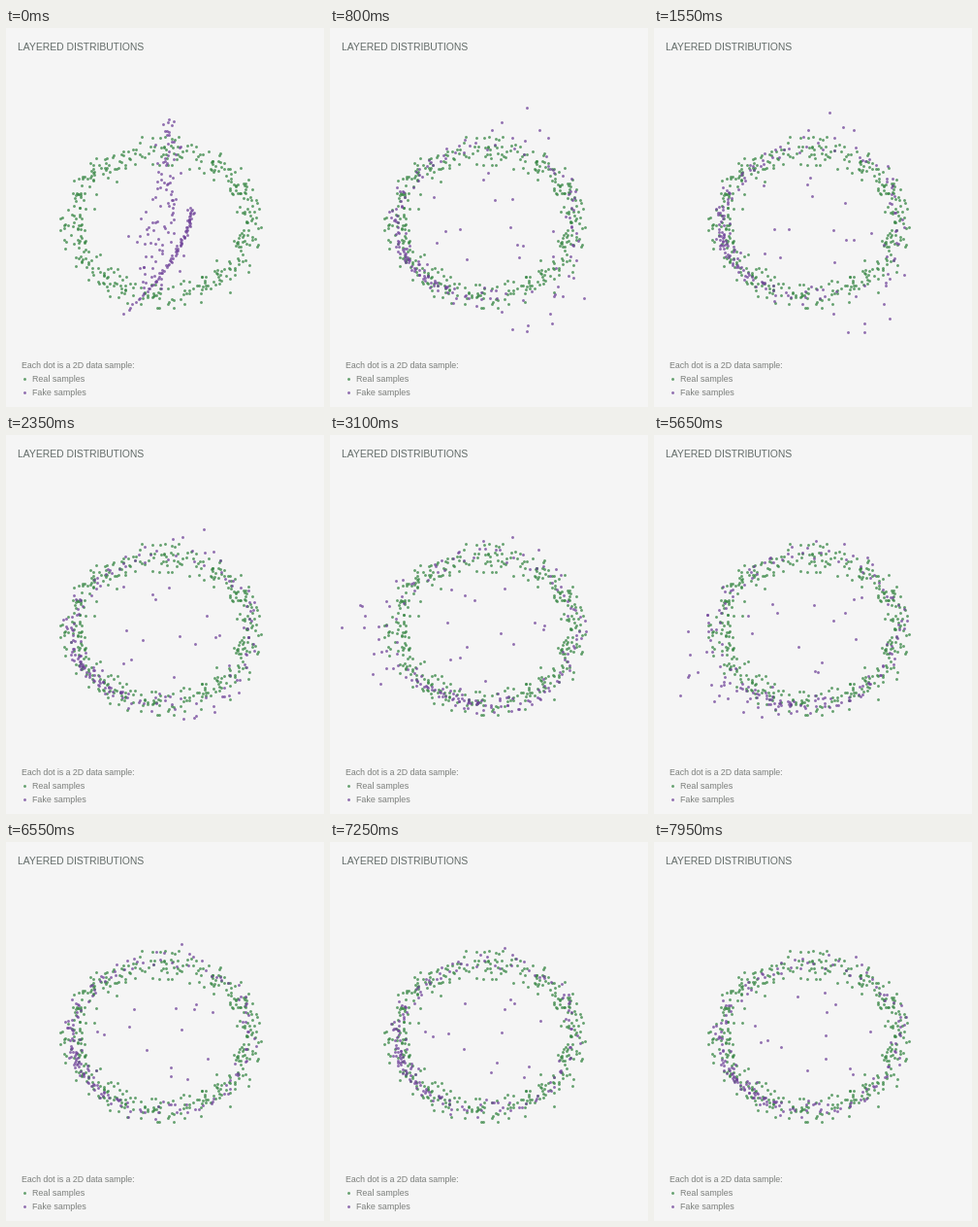
Write a matplotlib script that moves like this. It is 328 px wide and 390 px high and loops after 8 s.

```python
import numpy as np
import matplotlib.pyplot as plt
from matplotlib.animation import FuncAnimation

W, H, DPI = 328, 390, 100
STEP, FRAMES = 50, 160
PT = 72 / DPI
GREEN, PURPLE = "#358542", "#6f4299"
CX, CY, RX, RY = 161, 200, 91, 74
REAL, CURVE, LOOSE = 400, 165, 14

rng = np.random.default_rng(4)


def ring(deg, scale=1.0):
    a = np.radians(deg)
    return np.stack([CX + RX * scale * np.cos(a),
                     CY + RY * scale * np.sin(a)], axis=-1)


def jitter(n, limit):
    return np.clip(rng.normal(0, 1, (n, 2)), -limit, limit)


# Real samples: a noisy ellipse that stays still.
real = ring(np.linspace(0, 360, REAL) + rng.normal(0, 4, REAL)) + 7.2 * jitter(REAL, 2)

# Fixed latent values of the fake samples.
u = (np.arange(CURVE) + rng.uniform(0, 1, CURVE)) / CURVE
reach = rng.uniform(0, 1, CURVE) ** 1.3
noise = jitter(CURVE, 1.8)
k = np.arange(LOOSE)
loose_radius = 0.12 + 0.6 * np.sqrt((k + 0.5) / LOOSE)
loose_angle = 137.5 * k


def folded_sheet():
    """Opening pose: a tight bent line with a loose cloud beside it."""
    w = np.clip(u / 0.45, 0, 1)[:, None] ** 0.75
    a, b, c = np.array([(119, 297), (185, 235), (192, 186)])
    line = a * (1 - w) ** 2 + 2 * b * w * (1 - w) + c * w ** 2 + 1.1 * noise
    v = np.clip((u - 0.45) / 0.55, 0, 1)
    cloud = np.stack([140 + 30 * np.sqrt(v) + noise[:, 0] * (2 + 17 * (1 - v ** 2)),
                      270 - 175 * v + 4 * noise[:, 1]], axis=1)
    return np.where(u[:, None] < 0.45, line, cloud)


def lobe(angle, centre, width):
    gap = (angle - centre + 180) % 360 - 180
    return np.exp(-(gap / width) ** 2)


def generated_ring(t):
    """Dots crowd towards a swinging angle; three lobes bulge out and shrink back."""
    crowd = 115 + 50 * np.cos(2 * np.pi * (t - 1550) / 5400)
    base = 360 * u
    angle = base + np.degrees(0.65 * np.sin(np.radians(crowd - base)))
    top = 0.65 * np.exp(-t / 5000) * lobe(angle, -65 - 15 * np.sin(np.pi * t / 8000), 26)
    low = 1.05 * np.exp(-((t - 1000) / 1500) ** 2) * lobe(angle, 56, 24)
    left = np.exp(-((t - 4400) / 1500) ** 4) * lobe(angle, 206 - t / 100, 28)
    bulge = reach * (top + low + left)
    sway = 1.5 * np.sin(t / 150 + np.radians(base))[:, None]
    return ring(angle, 1.02 + bulge) + noise * (5 + 8 * bulge[:, None]) + sway


def loose_dots(t):
    """Few dots that swirl slowly inside the ring."""
    turn = 25 * np.sin(t / 1300 + k)
    return ring(loose_angle + turn, loose_radius + 0.06 * np.sin(t / 700 + 2 * k))


sheet = folded_sheet()


def fake_samples(t):
    x = min(t / 700, 1)
    ease = x * x * (3 - 2 * x)
    curve = sheet + (generated_ring(t) - sheet) * ease
    start = np.array([CX + 2, CY]) + (loose_dots(0) - [CX, CY]) * [0.35, 0.8]
    loose = start + (loose_dots(t) - start) * ease
    return np.vstack([curve, loose])


fig = plt.figure(figsize=(W / DPI, H / DPI), dpi=DPI, facecolor="#f5f5f5")
ax = fig.add_axes([0, 0, 1, 1])
ax.set(xlim=(0, W), ylim=(H, 0))
ax.axis("off")


def dots(pts, color, diameter=2.9):
    pts = np.asarray(pts)
    return ax.scatter(pts[:, 0], pts[:, 1], s=(diameter * PT) ** 2, c=color,
                      alpha=0.75, linewidths=0)


def label(x, y, text, px, color="#7c7f7c"):
    ax.text(x, y, text, fontsize=px * PT, color=color,
            family="Liberation Sans", va="baseline")


label(12, 23, "LAYERED DISTRIBUTIONS", 10.35, "#626b68")
label(16, 350.5, "Each dot is a 2D data sample:", 8.75)
for y, name, color in [(361, "Real samples", GREEN), (375, "Fake samples", PURPLE)]:
    dots([(19.2, y)], color)
    label(27, y + 3.5, name, 8.9)

dots(real, GREEN)
fake = dots(fake_samples(0), PURPLE)


def draw(i):
    fake.set_offsets(fake_samples(i * STEP))
    return [fake]


anim = FuncAnimation(fig, draw, frames=FRAMES, interval=STEP,
                     repeat=True, repeat_delay=0, blit=False)
plt.show()
```
